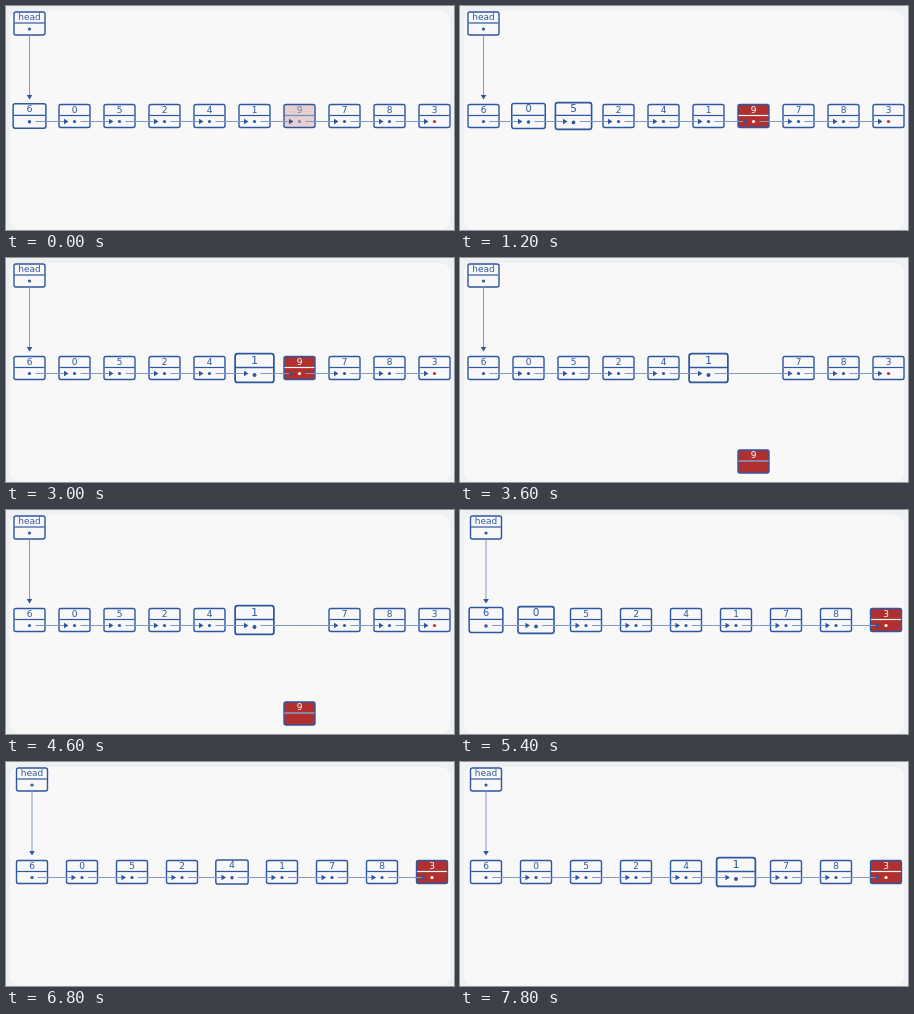
These frames come from a looping animation (448x224 px, 8000 ms). An HTML page with a canvas:

```html
<!DOCTYPE html>
<html lang="en">
<head>
<meta charset="utf-8">
<title>Linked list removal</title>
<style>
  html, body { margin: 0; width: 100%; height: 100%; overflow: hidden; background: #eef0f1; }
  canvas { display: block; width: 448px; height: 224px; }
</style>
</head>
<body>
<canvas id="stage" width="448" height="224"></canvas>
<script>
const ctx = document.getElementById('stage').getContext('2d');
const LOOP = 8000;
const BLUE = '#2f579f', LINK = '#8399c4', PAPER = '#f8f8f8', RED = '#b03030';
const VALUES = [6, 0, 5, 2, 4, 1, 9, 7, 8, 3];
const REMOVED = 6, LAST = 9, NODE_Y = 110, BOX_W = 31, BOX_H = 23;

// Each visit: node index, start of growth, peak, start of release, end.
const STEP = 520, FIRST = -160;
const visits = [0, 1, 2, 3, 4].map(i => {
  const start = FIRST + i * STEP;
  return [i, start, start + STEP, start + STEP, start + 2 * STEP];
});
visits.push(
  [5, FIRST + 5 * STEP, FIRST + 6 * STEP, 4620, 5050],
  [0, 4650, 5100, 5100, 5600],
  [1, 5100, 5600, 5600, 6050],
  [2, 5600, 6050, 6050, 6450],
  [3, 6050, 6400, 6400, 6800],
  [4, 6700, 7080, 7080, 7520],
  [5, 7080, 7520, 9000, 9500]
);

const clamp = v => Math.max(0, Math.min(1, v));
const mix = (a, b, p) => a + (b - a) * p;
const ease = (t, from, to) => {
  const p = clamp((t - from) / (to - from));
  return p * p * (3 - 2 * p);
};

function emphasis(index, t) {
  return Math.max(...visits.filter(v => v[0] === index)
    .map(([, start, peak, release, end]) => ease(t, start, peak) - ease(t, release, end)));
}

function withAlpha(alpha, draw) {
  if (alpha <= 0) return;
  ctx.save();
  ctx.globalAlpha *= alpha;
  draw();
  ctx.restore();
}

function line(x1, y1, x2, y2, color, width = 1) {
  ctx.strokeStyle = color;
  ctx.lineWidth = width;
  ctx.beginPath();
  ctx.moveTo(x1, y1);
  ctx.lineTo(x2, y2);
  ctx.stroke();
}

function dot(x, y, color) {
  ctx.fillStyle = color;
  ctx.beginPath();
  ctx.arc(x, y, 1.6, 0, 2 * Math.PI);
  ctx.fill();
}

function arrow(x, y, angle) {
  ctx.save();
  ctx.translate(x, y);
  ctx.rotate(angle);
  ctx.fillStyle = BLUE;
  ctx.beginPath();
  ctx.moveTo(0, 0);
  ctx.lineTo(-4.5, -2.8);
  ctx.lineTo(-4.5, 2.8);
  ctx.fill();
  ctx.restore();
}

function box(x, y, label, { scale = 1, red = 0, dotColor = BLUE, dotAlpha = 1, bareRule = 0 } = {}) {
  ctx.save();
  ctx.translate(x, y);
  ctx.scale(scale, scale);
  ctx.beginPath();
  ctx.roundRect(-BOX_W / 2, -BOX_H / 2, BOX_W, BOX_H, 2);
  ctx.fillStyle = PAPER;
  ctx.fill();
  withAlpha(red, () => { ctx.fillStyle = RED; ctx.fill(); });
  ctx.strokeStyle = BLUE;
  ctx.lineWidth = 1.4;
  ctx.stroke();

  const content = (color, ruleColor, pointColor) => {
    line(-BOX_W / 2 + .6, -.5, BOX_W / 2 - .6, -.5, ruleColor, 1.2);
    ctx.fillStyle = color;
    ctx.font = '9px "DejaVu Sans", sans-serif';
    ctx.textAlign = 'center';
    ctx.fillText(label, 0, -3.4);
    withAlpha(dotAlpha, () => dot(0, 5.5, pointColor));
  };
  withAlpha(1 - red, () => content(BLUE, BLUE, dotColor));
  withAlpha(red, () => content('#fff', '#fff', '#fff'));
  withAlpha(bareRule, () => line(-BOX_W / 2 + .6, -.5, BOX_W / 2 - .6, -.5, BLUE, 1.2));
  ctx.restore();
}

function link(fromX, toX, reach = 1) {
  const start = fromX + 6;
  line(start, 115.5, mix(start, toX - 10, reach), 115.5, LINK);
}

function render(t) {
  ctx.fillStyle = '#eef0f1';
  ctx.fillRect(0, 0, 448, 224);
  ctx.fillStyle = PAPER;
  ctx.beginPath();
  ctx.roundRect(4, 5, 440, 218.5, 9);
  ctx.fill();

  const shift = ease(t, 4620, 5050);
  const drop = ease(t, 3060, 3560);
  const detach = ease(t, 3040, 3300);
  const nodeX = i => mix(23.5 + 45 * i, 26 + 50 * (i > REMOVED ? i - 1 : i), shift);
  const xs = VALUES.map((_, i) => i === REMOVED ? 293.5 : nodeX(i));

  VALUES.forEach((value, i) => {
    const removed = i === REMOVED;
    const red = removed ? ease(t, -160, 400) : i === LAST ? ease(t, 4700, 5200) : 0;
    withAlpha(removed ? 1 - shift : 1, () => box(xs[i], NODE_Y + (removed ? 93.5 * drop : 0), value, {
      scale: 1 + .25 * (removed ? 0 : Math.max(0, emphasis(i, t))),
      red,
      dotColor: i === LAST ? '#c03030' : BLUE,
      dotAlpha: removed ? 1 - detach : 1,
      bareRule: removed ? .8 * drop : 0
    }));
  });

  for (let i = 0; i < LAST; i++) {
    const touchesRemoved = i === REMOVED || i + 1 === REMOVED;
    withAlpha(touchesRemoved ? 1 - detach : 1, () => {
      link(xs[i], xs[i + 1]);
      if (i + 1 === REMOVED) arrow(xs[i + 1] - 6, 115.5, 0);
    });
    if (i + 1 !== REMOVED) arrow(xs[i + 1] - 6, 115.5, 0);
  }
  if (detach > 0) link(xs[REMOVED - 1], xs[REMOVED + 1], ease(t, 3100, 3600));

  box(xs[0], 17.5, 'head');
  line(xs[0], 29.5, xs[0], 90, LINK);
  arrow(xs[0], 93.5, Math.PI / 2);
}

const origin = performance.now();
function tick() {
  render((performance.now() - origin) % LOOP);
  requestAnimationFrame(tick);
}
render(0);
requestAnimationFrame(tick);
</script>
</body>
</html>
```
